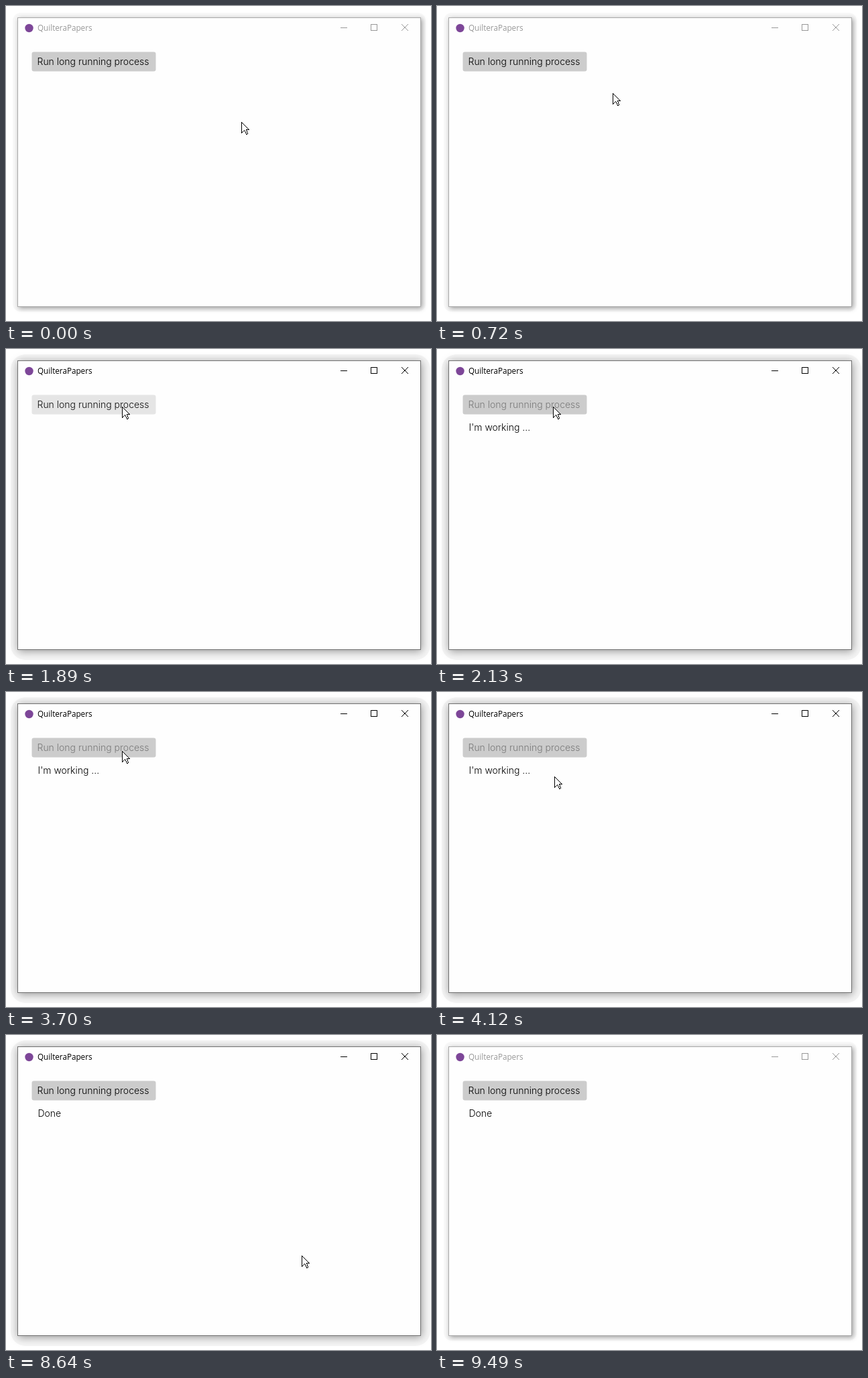
An HTML page with a canvas that plays this animation: 634x470 px, repeating every 9550 ms.

```html
<!DOCTYPE html>
<html lang="en">
<head>
<meta charset="utf-8">
<title>Long running process</title>
<style>
  html, body { margin: 0; width: 100%; height: 100%; overflow: hidden; background: #fff; }
  canvas { display: block; width: 634px; height: 470px; }
</style>
</head>
<body>
<canvas id="stage" width="634" height="470"></canvas>
<script>
const ctx = document.getElementById('stage').getContext('2d');
const LOOP = 9550;
const BUTTON = { x: 38.5, y: 68.5, w: 185, h: 29 };
const ARROW = [[0, 0], [11, 11], [7, 11], [9, 17], [8, 18], [7, 18], [4, 12], [0, 16]];
const BODY_FONT = '300 14px Inter, sans-serif';

const mix = (a, b, p) => a + (b - a) * p;
const smooth = p => p * p * (3 - 2 * p);

// Progress of a move that is sampled at evenly spaced steps, the first one at start.
function stepped(t, start, end, count) {
  if (t < start) return 0;
  const gap = (end - start) / (count - 1);
  return Math.min(1, (Math.floor((t - start) / gap + 1e-6) + 1) / count);
}

function roundRect(x, y, w, h, r, fill) {
  ctx.beginPath();
  ctx.roundRect(x, y, w, h, r);
  ctx.fillStyle = fill;
  ctx.fill();
}

function text(str, x, y, font, color) {
  ctx.font = font;
  ctx.fillStyle = color;
  ctx.fillText(str, x, y);
}

function line(...points) {
  ctx.beginPath();
  points.forEach(([x, y]) => ctx.lineTo(x, y));
  ctx.stroke();
}

function pixelLine([x0, y0], [x1, y1]) {
  const n = Math.max(Math.abs(x1 - x0), Math.abs(y1 - y0));
  for (let i = 0; i <= n; i++) {
    ctx.fillRect(Math.round(mix(x0, x1, i / n)), Math.round(mix(y0, y1, i / n)), 1, 1);
  }
}

function drawWindow(active) {
  if (active) roundRect(7, 8, 626, 456, 22, '#f5f5f5');
  else roundRect(10, 10, 616, 446, 12, '#f8f8f8');

  ctx.save();
  ctx.shadowColor = active ? 'rgba(0,0,0,.4)' : 'rgba(0,0,0,.38)';
  ctx.shadowBlur = active ? 12 : 7;
  ctx.shadowOffsetX = active ? 1 : 2;
  ctx.shadowOffsetY = 2;
  ctx.fillStyle = active ? '#707070' : '#aaa';
  ctx.fillRect(17, 17, 602, 432);
  ctx.restore();
  ctx.fillStyle = '#fefefe';
  ctx.fillRect(18, 18, 600, 430);

  ctx.beginPath();
  ctx.arc(34.5, 33, 6.2, 0, Math.PI * 2);
  ctx.fillStyle = '#7d4698';
  ctx.fill();

  const ink = active ? '#000' : '#999';
  text('QuilteraPapers', 47, 37, '11.7px "Open Sans", sans-serif', ink);
  ctx.strokeStyle = ink;
  ctx.lineWidth = 1;
  line([499, 32.5], [509, 32.5]);
  ctx.strokeRect(544.5, 27.5, 9, 9);
  line([590, 27], [600, 37]);
  line([600, 27], [590, 37]);
}

function buttonLook(t, cursor) {
  if (t >= 2130 && t < 7040) return { fill: '#ccc', ink: '#7a7a7a', scale: 1 };
  if (t >= 1950 && t < 2130) return { fill: '#999', ink: '#000', scale: t < 2070 ? .98 : .99 };
  const { x, y, w, h } = BUTTON;
  const hover = cursor && cursor.x > x && cursor.x < x + w && cursor.y > y && cursor.y < y + h;
  return { fill: hover ? '#e5e5e5' : '#ccc', ink: hover ? '#111' : '#000', scale: 1 };
}

function drawButton({ fill, ink, scale }) {
  const { x, y, w, h } = BUTTON;
  const cx = x + w / 2, cy = y + h / 2;
  ctx.save();
  ctx.translate(cx, cy);
  ctx.scale(scale, scale);
  ctx.translate(-cx, -cy);
  roundRect(x, y, w, h, 3, fill);
  text('Run long running process', 46.5, 88, BODY_FONT, ink);
  ctx.restore();
}

function cursorAt(t) {
  if (t >= 8750) return null;
  let x, y;
  if (t < 3700) {
    const p = smooth(stepped(t, 440, 950, 10));
    x = mix(351, 173, p);
    y = mix(173, 86, p);
  } else if (t < 8470) {
    const p = smooth(stepped(t, 3700, 4120, 8));
    x = mix(173, 175, p) - 1.5 * Math.sin(Math.PI * p);
    y = mix(86, 126, p);
  } else {
    const p = stepped(t, 8470, 8694, 5) ** 1.5;
    x = mix(175, 547, p);
    y = mix(126, 410, p);
  }
  return { x: Math.round(x), y: Math.round(y) };
}

function drawCursor({ x, y }) {
  ctx.save();
  ctx.translate(x, y);
  ctx.beginPath();
  ARROW.forEach(([px, py]) => ctx.lineTo(px + .5, py + .5));
  ctx.fillStyle = '#fff';
  ctx.fill();
  ctx.fillStyle = '#000';
  ARROW.forEach((point, i) => pixelLine(point, ARROW[(i + 1) % ARROW.length]));
  ctx.restore();
}

function draw() {
  const t = performance.now() % LOOP;
  const cursor = cursorAt(t);
  ctx.fillStyle = '#fff';
  ctx.fillRect(0, 0, 634, 470);
  drawWindow(t >= 1890 && t < 9490);
  drawButton(buttonLook(t, cursor));
  if (t >= 2130) text(t < 7040 ? "I'm working ..." : 'Done', 47.5, 122, BODY_FONT, '#000');
  if (cursor) drawCursor(cursor);
  requestAnimationFrame(draw);
}
draw();
</script>
</body>
</html>
```
